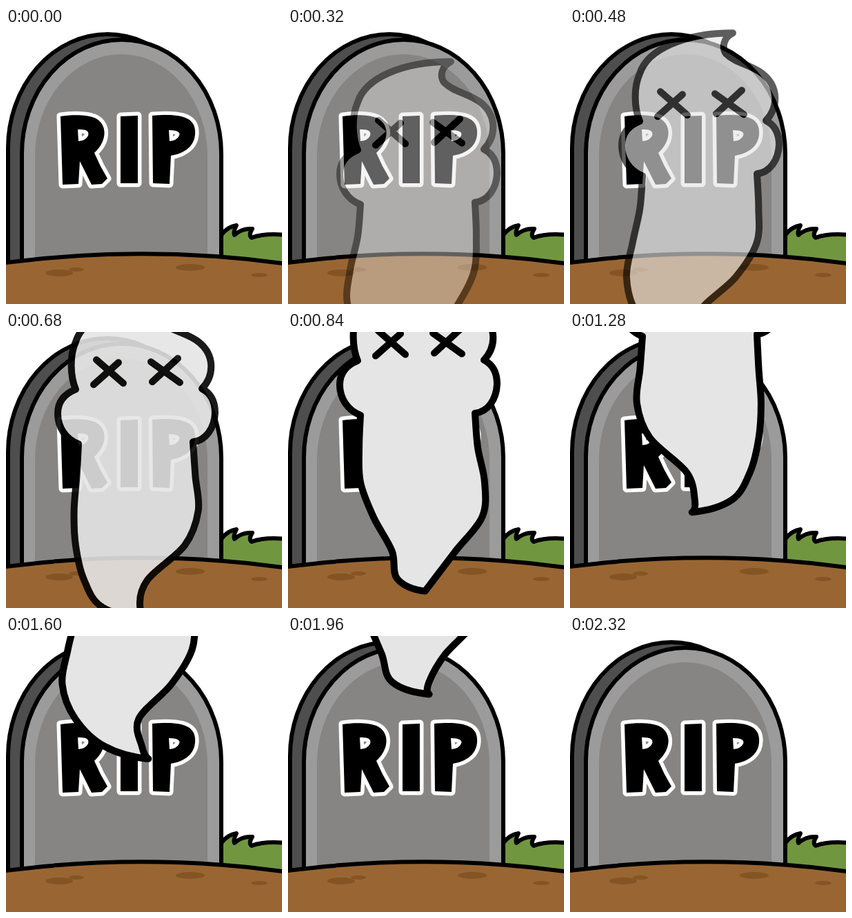
These frames come from a looping animation (400 by 400 pixels, 2360 ms). An HTML page:

```html
<!DOCTYPE html>
<html lang="en">
<head>
<meta charset="utf-8">
<title>Rising ghost</title>
<style>
  html, body { margin: 0; width: 100%; height: 100%; overflow: hidden; background: #fff; }
  svg { display: block; width: 100%; height: 100%; }
  .ink { stroke: #000; stroke-width: 6; stroke-linejoin: round; stroke-linecap: round; }
  .letters { fill: #000; fill-rule: evenodd; stroke: #fff; stroke-width: 11; stroke-linejoin: round; paint-order: stroke; }
  #ghost { stroke: #000; stroke-width: 10; stroke-linejoin: round; stroke-linecap: round; }
</style>
</head>
<body>
<svg viewBox="0 0 400 400">
  <path class="ink" fill="#719640" d="M312 300Q321 288 334 286Q329 296 331 300Q342 290 357 291Q351 300 356 304Q374 297 406 300V350H312Z"/>

  <g id="stone">
    <path class="ink" fill="#4e4e4e" d="M3 350V174A144 165 0 0 1 291 174V350Z"/>
    <path class="ink" fill="#9b9b9b" d="M23 350V182A144.500 165 0 0 1 312 182V350Z"/>
    <path fill="#878583" d="M42 350V185A125 147 0 0 1 292 185V350Z"/>
  </g>

  <g class="letters" role="img" aria-label="RIP">
    <path d="M79 128C98 125 118 126 128 130C147 138 148 163 128 181Q136 200 147 218L139 226L124 227L107 193L105 226L82 227ZM104 147Q122 146 119 156Q116 163 105 164Z"/>
    <path d="M166 128L191 127L191 225L166 225Z"/>
    <path d="M212 127C250 124 272 128 274 148C276 171 258 182 239 185L237 226L213 225ZM236 148Q254 148 251 156Q248 163 237 164Z"/>
  </g>

  <path class="ink" fill="#963" d="M-8 341Q200 313 408 342V410H-8Z"/>
  <g fill="#845424">
    <ellipse cx="77" cy="355" rx="20" ry="5"/>
    <ellipse cx="102" cy="350" rx="11" ry="3"/>
    <ellipse cx="267" cy="347" rx="21" ry="5"/>
    <ellipse cx="367" cy="358" rx="12" ry="3"/>
  </g>

  <g id="ghost" opacity="0">
    <path id="shape" fill="#e5e5e5"/>
    <path fill="none" d="M127-83L163-115M131-119L170-85M212-87L249-121M210-116L252-86"/>
  </g>
</svg>
<script>
const LOOP = 2360, STEP = 40, WAG = LOOP / 2, FADE = 760, SPEED = 0.26;
const LENGTH = 258;
const ghost = document.getElementById('ghost');
const shape = document.getElementById('shape');

const HEAD = 'M105 3C86-4 75-22 75-41C75-60 86-70 101-76C93-95 92-125 101-145' +
  'C112-180 165-204 236-204C222-197 220-183 226-174C240-160 262-158 279-145' +
  'C303-126 302-96 284-77C298-70 303-58 303-42C302-20 290-2 271 0';

// Tail outline at rest: distance below the head and half width there
const ROWS = [[50, 86], [100, 90], [150, 79], [200, 46], [240, 27]];

// A wave runs down the tail; the tip flicks the other way
function tailSides(t) {
  const phase = 2 * Math.PI * t / WAG;
  const tip = [194 - 20 * Math.cos(phase), LENGTH];
  const side = sign => ROWS.map(([y, half]) => {
    const u = y / LENGTH;
    const sway = 47 * Math.sin(3.2 * u ** 3) * Math.cos(phase + 1.9 * (1 - u));
    return [188 + sway + sign * half, y];
  });
  return [[[105, 3], ...side(-1), tip], [[271, 0], ...side(1), tip]];
}

// Smooth curve through the points, still bending as it reaches the last one
function spline(points) {
  const [p, q, r] = points.slice(-3);
  const beyond = r.map((v, j) => 3 * v - 3 * q[j] + p[j]);
  const all = [points[0], ...points, beyond];
  return points.slice(1).map((b, i) => {
    const [before, a, , after] = all.slice(i, i + 4);
    const c1 = a.map((v, j) => v + (b[j] - before[j]) / 6);
    const c2 = b.map((v, j) => v - (after[j] - a[j]) / 6);
    return [a, c1, c2, b];
  });
}

const curves = list => list.map(([, ...rest]) => 'C' + rest.flat().join(' ')).join('');
const reversed = list => list.map(curve => curve.slice().reverse()).reverse();

function draw(now) {
  const t = Math.floor(now % LOOP / STEP) * STEP;
  const [left, right] = tailSides(t).map(spline);
  shape.setAttribute('d', HEAD + curves(right) + curves(reversed(left)) + 'Z');
  ghost.setAttribute('transform', `translate(0 ${336 - SPEED * t})`);
  ghost.setAttribute('opacity', Math.min(1, t / FADE));
}

const start = performance.now();
function tick() {
  draw(performance.now() - start);
  requestAnimationFrame(tick);
}
tick();
</script>
</body>
</html>
```
